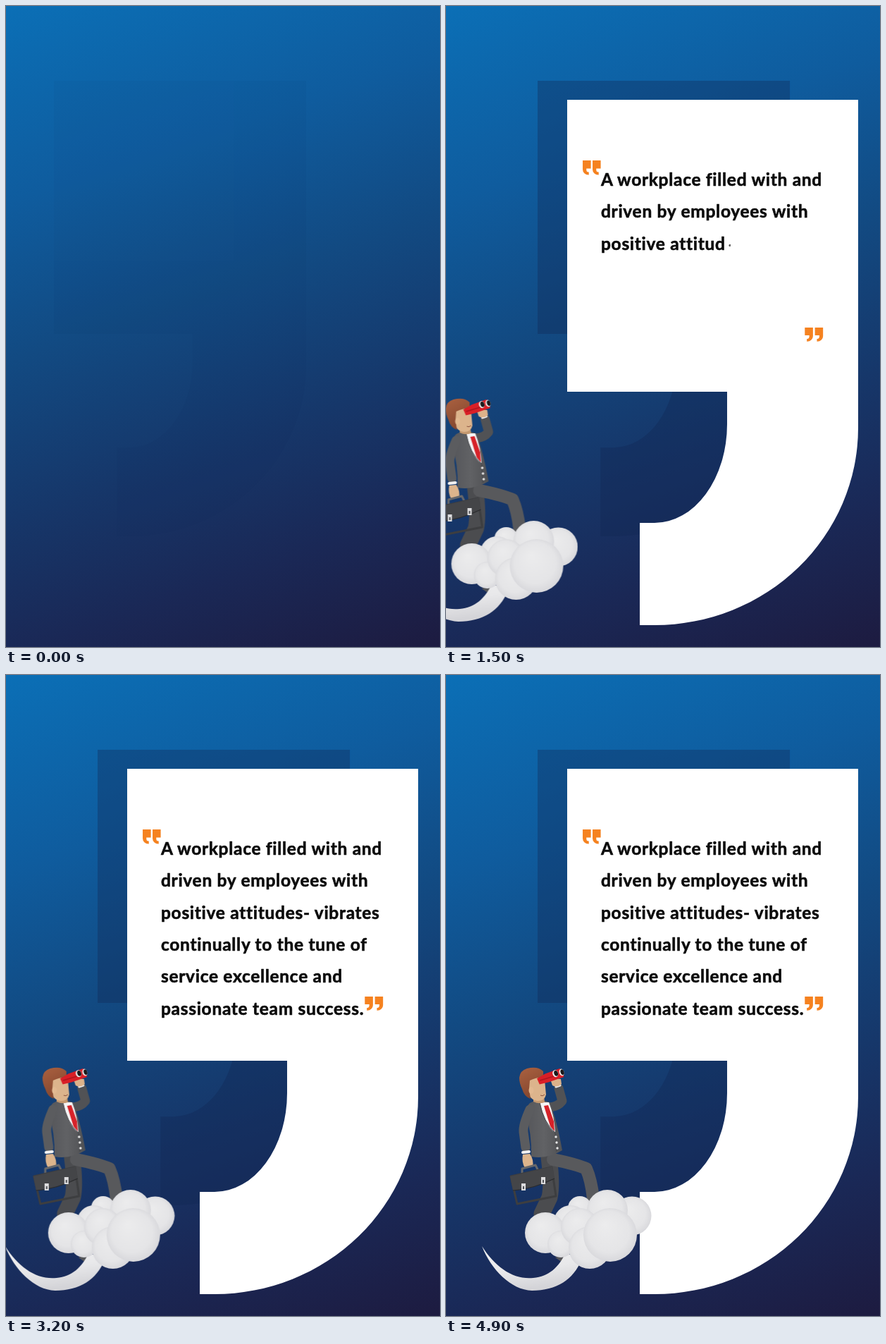
An HTML page for the animation above (5000 ms loop, 616 by 909 pixels).

```html
<!DOCTYPE html>
<html lang="en">
<head>
<meta charset="utf-8">
<title>Workplace quote</title>
<style>
  html, body { margin: 0; width: 100%; height: 100%; overflow: hidden; }
  body {
    background: linear-gradient(161deg, #0b6fb6 0%, #0f5c9e 25%, #124a82 45%, #16376a 65%, #1a2856 82%, #1d1b40 100%);
  }
  svg { display: block; width: 616px; height: 909px; }

  .pan, .tumble, .drift { opacity: 0; }
  .pan { animation: pan 460ms cubic-bezier(.33, .67, .67, 1) forwards; }
  .tumble {
    transform-box: fill-box;
    transform-origin: center;
    animation: tumble 360ms cubic-bezier(.33, .67, .67, 1) forwards;
  }
  .drift { animation: drift 4s linear 900ms forwards, fade 400ms linear 900ms forwards; }
  .card { animation-delay: 200ms; }
  .open { animation-delay: 520ms; }
  .close { animation-delay: 1130ms; }

  @keyframes pan {
    from { transform: translateX(-62px); opacity: .12; }
    to { transform: none; opacity: 1; }
  }
  @keyframes tumble {
    from { transform: translate(154px, -169px) rotate(-36deg); opacity: .3; }
    30% { opacity: 1; }
    to { transform: translate(0, 0) rotate(0deg); opacity: 1; }
  }
  @keyframes drift {
    from { transform: translateX(-123px); }
    to { transform: none; }
  }
  @keyframes fade {
    from { opacity: 0; }
    to { opacity: 1; }
  }

  #words text {
    font: 700 24.5px Lato, "Open Sans", sans-serif;
    font-variant-ligatures: none;
    letter-spacing: .7px;
    white-space: pre;
    fill: #0b0b0b;
    stroke: #0b0b0b;
    stroke-width: .6;
    stroke-linejoin: round;
  }
  .limb { fill: none; stroke-linecap: round; stroke-linejoin: round; }
</style>
</head>
<body>
<svg viewBox="0 0 616 909">
  <defs>
    <path id="comma" d="M0 0H413V465A289 280 0 0 1 124 745H103V600H124A103 140 0 0 0 227 460V414H0Z"/>
    <radialGradient id="puff" cx=".5" cy=".5" r=".55" fx=".4" fy=".3">
      <stop offset="0" stop-color="#ececed"/>
      <stop offset=".7" stop-color="#e5e5e7"/>
      <stop offset="1" stop-color="#d5d5d9"/>
    </radialGradient>
    <linearGradient id="swoosh" x1="0" y1="0" x2=".3" y2="1">
      <stop offset="0" stop-color="#f2f2f3"/>
      <stop offset=".6" stop-color="#e8e8ea"/>
      <stop offset="1" stop-color="#d4d4d8"/>
    </linearGradient>
    <linearGradient id="suit">
      <stop offset="0" stop-color="#55565a"/>
      <stop offset=".5" stop-color="#616265"/>
      <stop offset="1" stop-color="#505154"/>
    </linearGradient>
    <linearGradient id="hair" x1="0" y1="0" x2=".4" y2="1">
      <stop offset="0" stop-color="#ab6140"/>
      <stop offset="1" stop-color="#84472f"/>
    </linearGradient>
  </defs>

  <g class="pan">
    <use href="#comma" transform="translate(130 106) scale(.867)" fill="#142854" fill-opacity=".34"/>
  </g>
  <g class="pan card">
    <use href="#comma" x="172" y="133" fill="#fff"/>
  </g>

  <g id="words"></g>

  <g class="tumble open" fill="#f58220">
    <use href="#comma" transform="translate(205.6 219) scale(-.028 .0275)"/>
    <use href="#comma" transform="translate(219.6 219) scale(-.028 .0275)"/>
  </g>
  <g class="tumble close" fill="#f58220">
    <use href="#comma" transform="translate(509.3 456) scale(.028 .0265)"/>
    <use href="#comma" transform="translate(523.6 456) scale(.028 .0265)"/>
  </g>

  <g class="drift">
    <!-- legs -->
    <path class="limb" d="M146 684Q151 722 147 741L136 764" stroke="#4b4c4f" stroke-width="23"/>
    <path class="limb" d="M152 687Q186 694 199 700Q206 716 209 742" stroke="#58595c" stroke-width="18"/>
    <path d="M155 826L172 821L165 833Z" fill="#55565a"/>

    <!-- raised arm -->
    <path class="limb" d="M147 613Q159 612 165 604L160 586" stroke="#515255" stroke-width="13"/>
    <path class="limb" d="M156 584L162 582" stroke="#e8e8ea" stroke-width="3"/>

    <!-- torso -->
    <path d="M119 607Q133 600 147 606Q157 630 165 674Q144 687 121 683Q122 650 113 622Q114 611 119 607Z" fill="url(#suit)"/>
    <path d="M133 606L146 606Q154 626 155 649Q141 640 133 606Z" fill="#f4f4f5"/>
    <path d="M139 611L145 610L153 633L154 647L148 640Z" fill="#d62229"/>
    <path d="M133 606Q138 634 155 649L157 676" fill="none" stroke="#45464a" stroke-width="1"/>
    <g fill="#e6e6e6">
      <circle cx="156" cy="655" r="1.700"/>
      <circle cx="157" cy="663" r="1.700"/>
      <circle cx="158" cy="671" r="1.700"/>
    </g>

    <!-- head -->
    <path d="M124 596L139 596L140 606Q132 609 124 605Z" fill="#c4986f"/>
    <path d="M116 574Q130 567 140 574L142 595Q140 604 130 604Q119 603 116 590Z" fill="#dcb48c"/>
    <path d="M104 571Q105 561 115 558Q130 554 138 562L138 570Q127 571 119 575L118 587L120 601Q111 598 108 587Q104 579 104 571Z" fill="url(#hair)"/>
    <ellipse cx="121" cy="589" rx="3.500" ry="5" fill="#e2b991"/>
    <path d="M134 596Q137 598 140 595" fill="none" stroke="#8b523c" stroke-width="1"/>

    <!-- binoculars -->
    <path d="M149 576Q155 571 163 573L164 580Q158 586 151 582Z" fill="#dcb28a"/>
    <g transform="translate(130 575) rotate(-17)">
      <path d="M0-3L13-6L35-7Q40-1 37 6L14 7L1 6Z" fill="#d91f27"/>
      <path d="M3 1L30 1" stroke="#ad161f" stroke-width="1.500"/>
      <ellipse cx="27" cy="-2" rx="4" ry="5" fill="#f0f0f0"/>
      <ellipse cx="36" cy="-1" rx="3.500" ry="5" fill="#f0f0f0"/>
      <ellipse cx="28" cy="-2" rx="2.800" ry="4" fill="#19191b"/>
      <ellipse cx="37" cy="-1" rx="2.500" ry="4" fill="#19191b"/>
    </g>

    <!-- hanging arm -->
    <path class="limb" d="M119 616Q109 638 110 648L113 670" stroke="#5b5c5f" stroke-width="13"/>
    <path class="limb" d="M109 677L118 676" stroke="#f2f2f3" stroke-width="4"/>
    <path d="M109 680L119 679Q125 688 123 697L112 699Q107 691 109 680Z" fill="#dcb48c"/>

    <!-- briefcase -->
    <path class="limb" d="M108 706L108 700L127 695L130 701" stroke="#66676a" stroke-width="3"/>
    <path class="limb" d="M92 711L150 698L156 739L101 750Z" fill="#3d3e40" stroke="#3d3e40" stroke-width="3"/>
    <path d="M91 711L151 697L154 714Q124 729 95 731Z" fill="#444548"/>
    <path d="M95 731Q124 729 154 714" fill="none" stroke="#2a2b2d" stroke-width="1.200"/>
    <path d="M110 721V731M138 712V722" stroke="#dcdcde" stroke-width="6"/>
    <path d="M110 725V729M138 716V720" stroke="#55565a" stroke-width="2"/>

    <!-- cloud -->
    <path d="M51 810C70 840 96 858 124 855C146 853 160 840 170 819L192 830C181 857 157 873 122 873C92 872 64 843 51 810Z" fill="url(#swoosh)"/>
    <g fill="url(#puff)">
      <circle cx="190" cy="756" r="17"/>
      <circle cx="264" cy="767" r="27.500"/>
      <circle cx="229" cy="759" r="29"/>
      <circle cx="177" cy="776" r="24"/>
      <circle cx="141" cy="791" r="29"/>
      <circle cx="163" cy="807" r="19"/>
      <circle cx="190" cy="783" r="27"/>
      <circle cx="204" cy="812" r="30"/>
      <circle cx="233" cy="794" r="38"/>
    </g>
  </g>
</svg>
<script>
  const LOOP = 5000, STEP = 100;
  const TYPE_START = 582, CHARS_PER_MS = 0.0732;
  const LEFT = 220, TOP = 255, LEADING = 45.3;
  const lines = [
    'A workplace filled with and',
    'driven by employees with',
    'positive attitudes- vibrates',
    'continually to the tune of',
    'service excellence and',
    'passionate team success.'
  ];

  const words = document.getElementById('words');
  function addText(x, y) {
    const el = document.createElementNS('http://www.w3.org/2000/svg', 'text');
    el.setAttribute('x', x);
    el.setAttribute('y', y);
    return words.appendChild(el);
  }
  const rows = lines.map((_, i) => addText(LEFT, TOP + i * LEADING));
  const growing = addText(-6, 6);

  const motions = document.getAnimations();
  motions.forEach(m => m.pause());

  function type(t) {
    let left = Math.max(0, (t - TYPE_START) * CHARS_PER_MS);
    growing.textContent = '';
    lines.forEach((line, i) => {
      const n = Math.min(line.length, Math.floor(left));
      rows[i].textContent = line.slice(0, n);
      // the next letter grows from its middle
      if (left > 0 && n < line.length) {
        const x = LEFT + (n ? rows[i].getComputedTextLength() : 0) + 6;
        const y = TOP + i * LEADING - 6;
        growing.textContent = line[n];
        growing.setAttribute('transform', `translate(${x} ${y}) scale(${left - n})`);
      }
      left = Math.max(0, left - line.length);
    });
  }

  let shown = -1;
  const start = performance.now();
  function draw(now) {
    let t = Math.floor(Math.max(0, now - start) % LOOP / STEP) * STEP;
    if (t === STEP) t = 0; // the opening pose holds for two steps
    if (t !== shown) {
      shown = t;
      motions.forEach(m => { m.currentTime = t; });
      type(t);
    }
    requestAnimationFrame(draw);
  }
  draw(start);
</script>
</body>
</html>
```
